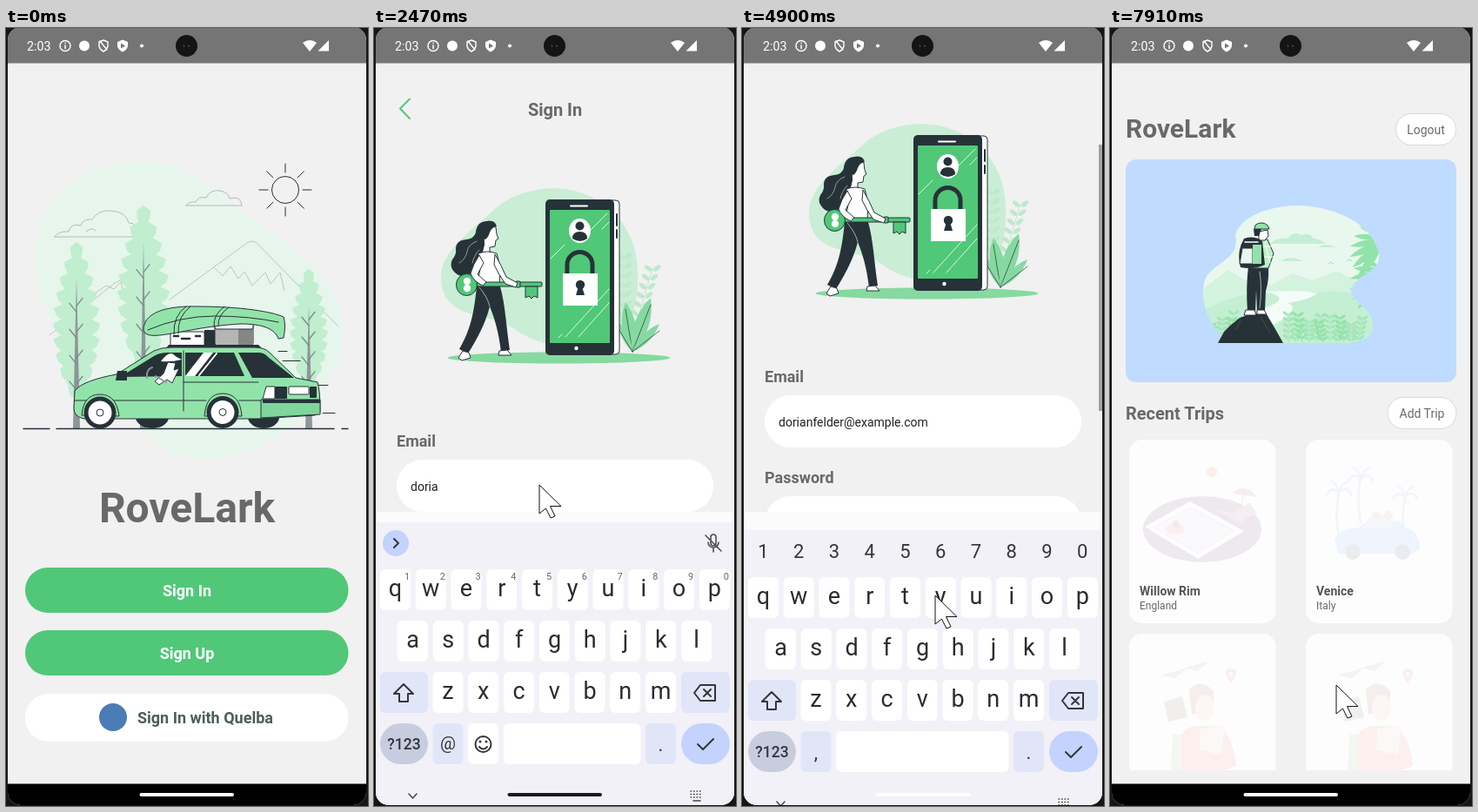
These frames come from a looping animation (416x894 px, 8000 ms). An HTML page:

```html
<!DOCTYPE html>
<html lang="en">
<head>
<meta charset="utf-8">
<title>Trip planner sign-in</title>
<style>
html, body { margin: 0; width: 100%; height: 100%; overflow: hidden; background: #161616; }
svg { display: block; width: 100vw; height: 100vh; font-family: Roboto, sans-serif; }
.b { font-weight: 700; }
.h { font-weight: 500; }
.m { text-anchor: middle; }
.e { text-anchor: end; }
</style>
</head>
<body>
<svg id="stage" viewBox="0 0 416 894"></svg>
<script>
const GREEN = '#50c878', MINT = '#92e3a9', LEAF = '#86d9a0', DARK = '#263238', GRAY = '#696969', KEYS = '#f2f1f8', INK = '#35363c';
const EMAIL = 'dorianfelder@example.com';

const text = (x, y, size, fill, str, cls = '') =>
  `<text x="${x}" y="${y}" font-size="${size}" fill="${fill}" class="${cls}">${str}</text>`;
const box = (x, y, w, h, r, fill, extra = '') =>
  `<rect x="${x}" y="${y}" width="${w}" height="${h}" rx="${r}" fill="${fill}" ${extra}/>`;
const dot = (x, y, r, fill, extra = '') => `<circle cx="${x}" cy="${y}" r="${r}" fill="${fill}" ${extra}/>`;
const oval = (x, y, rx, ry, fill, extra = '') =>
  `<ellipse cx="${x}" cy="${y}" rx="${rx}" ry="${ry}" fill="${fill}" ${extra}/>`;
const path = (d, fill, extra = '') => `<path d="${d}" fill="${fill}" ${extra}/>`;
const line = (d, color = DARK, w = 1, extra = '') =>
  `<path d="${d}" fill="none" stroke="${color}" stroke-width="${w}" stroke-linecap="round" stroke-linejoin="round" ${extra}/>`;
const outlined = `stroke="${DARK}" stroke-width="1" stroke-linejoin="round"`;
const range = n => [...Array(n).keys()];
const button = (id, x, y, w, label) =>
  `<g id="${id}">${box(x, y, w, 52, 26, GREEN)}${text(208, y + 33, 18, '#fff', label, 'b m')}</g>`;

// Jagged poplar with a tapered trunk
function tree(x, top, len, w) {
  const n = 10, s = len / n, right = [], left = [];
  range(n).forEach(i => {
    const u = (i + .6) / n, h = w * Math.sin(Math.PI * u ** 1.25) ** .6, y = top + s * (i + 1);
    right.push(`${x + h} ${y - s * .7} ${x + h * .9} ${y - s * .3} ${x + h * .62} ${y}`);
    left.unshift(`${x - h * .62} ${y} ${x - h * .9} ${y - s * .3} ${x - h} ${y - s * .7}`);
  });
  const twigs = range(4).map(i => {
    const y = top + len * (.36 + i * .17);
    return `M${x} ${y + 9}l7 -9M${x} ${y + 16}l-8 -10`;
  }).join('');
  return path(`M${x} ${top}L${right.join(' ')} ${left.join(' ')}Z`, '#c0eecf',
      'stroke="#c0eecf" stroke-width="2" stroke-linejoin="round"') +
    path(`M${x} ${top + 40}L${x + 4} 460H${x - 4}Z`, '#8e9698') + line(twigs, '#7d888b', 1.3);
}

// Pointed leaf from base to tip; bulge is relative to its length
function leaf(bx, by, x, y, bulge, color) {
  const mx = (bx + x) / 2, my = (by + y) / 2, px = (by - y) * bulge, py = (x - bx) * bulge;
  return path(`M${bx} ${by}Q${mx - px} ${my - py} ${x} ${y}Q${mx + px} ${my + py} ${bx} ${by}Z`, color);
}

// Stem with pairs of small leaves
function sprig(x, y, h, r, color, k = 5, lean = 0) {
  const leaves = range(k).map(i => {
    const yy = y - h * (i + 1) / k, xx = x + lean * (i + 1) / k;
    return [-1, 1].map(d => oval(xx + d * r, yy, r, r * .5, color, `transform="rotate(${d * -38} ${xx + d * r} ${yy})"`)).join('');
  }).join('');
  return line(`M${x} ${y}L${x + lean} ${y - h}`, color) + leaves;
}

const wheel = (x, y) => dot(x, y, 18.5, DARK) + dot(x, y, 13.5, '#fff') + dot(x, y, 4, '#fff', outlined);

function carArt() {
  const rays = range(8).map(i => {
    const a = i * Math.PI / 4, c = Math.cos(a), s = Math.sin(a);
    return `M${321 + 20 * c} ${186 + 20 * s}L${321 + 30 * c} ${186 + 30 * s}`;
  }).join('');
  return path('M152 153C92 153 34 195 34 265C34 330 70 360 110 400C150 450 170 496 235 495C310 494 388 420 387 340C386 280 300 235 250 195C215 165 190 153 152 153Z', '#e6f6ec') +
    line('M56 240H156M56 240Q60 233 72 234Q74 224 86 227Q88 219 99 220Q106 209 120 210Q138 211 141 224Q152 223 150 240M92 234Q99 228 103 233M207 204H271M207 204Q210 199 218 200Q221 193 230 195Q235 185 246 187Q256 189 257 196Q270 192 271 204', '#b0b4b4', .9) +
    line('M50 353L125 293L137 287L150 300M188 312L277 247Q282 243 288 247L382 343M102 305L115 296L124 300L132 292L135 304M240 276L249 285L258 274L267 288L274 280L283 296L298 281L304 294L315 281L320 302', '#b9bdbd', .9) +
    dot(321, 186, 15.5, 'none', outlined) + line(rays) +
    tree(81, 247, 176, 26) + tree(158, 205, 185, 29) + tree(348, 278, 134, 21) +
    line('M20 460.5H50M58 460.5H377M386 460.5H393', DARK, 1.4) +
    line('M313 371.5H323M318 382.5H338M358 410.5H370M364 442.5H378') +
    oval(168, 447, 19, 13, DARK) + oval(296, 447, 18, 13, DARK) +
    box(189, 349, 39, 16, 1, '#fff', outlined) + box(228, 347, 12, 18, 0, DARK) +
    box(240, 338, 44, 27, 3, '#b5b5b5', outlined) + box(267, 346, 17, 19, 0, '#868686') + box(240, 338, 44, 8, 2, '#f2f2f2', outlined) +
    line('M193 354H198M218 354H223M202 357H211', DARK, 2.5) +
    path('M158 347C158 327 184 319 220 320C270 320 306 326 319 332Q322 342 319 356L313 357C309 346 296 340 270 340C230 342 202 350 177 353Q159 355 158 347Z', MINT, outlined) +
    line('M163 347Q200 331 240 331T313 338M193 352Q192 330 207 320M198 351Q197 331 212 320M239 343Q238 329 251 320M244 342Q243 330 256 321') +
    path('M184 368L187 364H290L294 368Z', DARK) +
    path('M79 417Q88 405 127 398L170 371Q178 367 190 367H286Q297 367 303 373L333 402L358 407Q361 416 361 441L355 445L290 449H90Q78 447 78 437Z', MINT, outlined) +
    path('M131 401L170 377Q176 373 186 373H202V400Z', DARK) + path('M206 373H262L274 400H206Z', DARK) +
    path('M267 373H290Q297 373 301 378L331 402H283Z', DARK) +
    path('M206 400L227 373H238L217 400Z', '#fff') + line('M222 399L242 374', '#fff', 2) +
    line('M204 371V440M79 428H230M268 428H360M204 407H290') +
    path('M128 394H139V405H126Z', DARK) +
    path('M178 383Q185 373 191 374Q196 379 202 381Q190 384 178 383Z', '#fff') +
    path('M186 384L195 385L193 393L199 391L191 408L185 404L176 410L171 406L181 397Z', '#fff', outlined) +
    line('M162 402Q161 392 168 390M172 400L184 407', '#8e9698', 2) +
    path('M295 426L299 412H309V426Z', '#fff', outlined) + box(309, 412, 14, 14, 1, DARK) + box(325, 412, 23, 9, 1, '#fff', outlined) + box(349, 412, 8, 13, 1, DARK) +
    path('M293 427H361V444L293 448Z', '#7fd69a', outlined) + line('M296 428H360V430H296Z', DARK, 2) +
    path('M87 445Q89 421 108 421Q127 421 130 446Z', MINT, outlined) + path('M228 446Q230 420 249 420Q269 420 271 446Z', MINT, outlined) +
    wheel(108, 442) + wheel(249, 441.5);
}

function lockArt() {
  const plant = (x, y, bulge) => leaf(297, 379, x, y, bulge, LEAF) + line(`M297 379L${x} ${y + 8}`, DARK, .7);
  return path('M77 292C78 262 112 240 140 214C160 196 195 187 225 193C268 201 301 235 303 285C305 330 292 372 250 374C215 376 185 370 160 352C135 333 76 345 77 292Z', '#c9eed5') +
    oval(212.5, 386, 128, 6.5, LEAF) +
    sprig(287, 345, 76, 5, '#bfe9cb', 7) + sprig(302, 345, 62, 5, '#bfe9cb', 6, 18) +
    plant(289, 322, .28) + plant(318, 317, .25) + plant(328, 347, .22) + plant(281, 345, .2) +
    box(268, 205, 14, 177, 4, '#fff', outlined) + line('M279 221V234M279 239V248', DARK, 2) +
    box(197, 204, 79, 179, 5, DARK) + box(202, 216, 69, 153, 1, GREEN) +
    line('M226 211.5H245', '#fff', 2) + dot(232.5, 375, 2.2, '#fff') +
    line('M203 272L219 256M240 248L268 220M262 238L270 230M220 362L270 307M235 362L270 323M212 363L216 359', '#d9f6e3', 1) +
    oval(236.5, 240, 12.5, 14, '#fff') + dot(236.5, 234.5, 5, DARK) + path('M228 249Q228 241 236.5 241Q245 241 245 249Q237 255 228 249Z', DARK) +
    line('M222 290V279A14.5 14.5 0 0 1 251 279V290', DARK, 5) + box(217, 289, 40, 37, 0, '#fff') +
    dot(237, 302, 5.2, DARK) + path('M235 304H239L242 314H232Z', DARK) +
    path('M127 232Q118 233 117 242Q115 249 106 250Q94 251 94 261Q95 267 90 273Q86 281 93 288Q99 294 107 291Q118 288 121 275Q129 263 130 247Z', DARK) +
    line('M118 252Q108 256 107 264Q105 273 98 277M121 262Q115 268 113 277', '#fff', .5) +
    path('M128 240Q134 233 140 236L141 244L143 249L140 251L139 258L133 259V265L124 266Q128 256 126 246Z', '#fff', outlined) +
    path('M117 244Q117 230 129 229Q139 227 141 235Q135 236 133 242Q131 248 128 250Z', DARK) +
    path('M120 266Q130 262 141 266L145 281L144 304H118L122 284Z', '#fff', outlined) +
    path('M118 304H145C151 325 152 352 156 377L146 379C143 355 139 342 133 327C128 347 118 365 108 381L98 376C111 354 115 334 118 304Z', DARK) +
    line('M121 305Q131 317 133 327', '#fff', .6) +
    path('M102 378L109 380L111 386L101 389L97 386Z', '#fff', outlined) + path('M144 378L153 377L158 383H143Z', '#fff', outlined) +
    box(116, 299, 77, 5, 1, GREEN, outlined) + box(163, 298, 5, 7, 1, GREEN, outlined) + path('M174 304H188V317L184 315L181 318L178 315L174 317Z', GREEN, outlined) +
    oval(106.5, 302, 12, 12.5, GREEN, outlined) + dot(107, 298, 4.2, '#fff') + dot(107, 306, 4.2, '#fff') +
    path('M121 268Q114 278 111 289Q114 298 125 303L129 299L119 290L126 277Z', '#fff', outlined) +
    path('M139 267Q147 281 152 293L165 300L163 305L151 301Q143 290 138 279Z', '#fff', outlined);
}

function hikerArt() {
  const bush = range(15).map(i =>
    sprig(i < 4 ? 121 + i * 8 : 173 + i * 8, 361, 20 + (i * 7) % 15, 3.4, i % 3 ? '#a5e5b9' : MINT, 5, (i % 3 - 1) * 5)).join('');
  const frond = [[311, 238], [311, 275]].map(([x, y]) => range(6).map(i => {
    const a = 2.3 + i * .32;
    return leaf(x, y + i * 3, x + 36 * Math.cos(a), y + i * 4 - 26 * Math.sin(a) + 10, .2, MINT);
  }).join('')).join('');
  return `<clipPath id="view">${path('M144 238C151 214 188 204 216 204C264 205 304 229 309 259C312 281 282 284 277 299C274 314 302 322 302 341C302 357 287 362 262 362H140C112 342 105 318 108 293C113 270 151 268 144 238Z', '#fff')}</clipPath>
    <g clip-path="url(#view)">${box(100, 200, 215, 170, 0, '#e9f8ee')}` +
    path('M183 248Q193 240 204 242Q212 232 220 238Q229 234 234 242Q242 242 248 248Z', '#c4efd2') +
    path('M196 268Q207 260 222 268ZM239 252Q247 246 260 252Z', '#c4efd2') + line('M251 271l3 -2l3 2M272 268l3 -2l3 2', MINT) +
    path('M100 305L136 278L174 301L210 282L232 290L260 279L315 306V370H100Z', '#d4f3de') +
    path('M100 330Q150 295 212 309Q270 292 315 319V370H100Z', '#c4efd2') +
    path('M180 303Q219 300 238 305Q231 312 204 316Q221 322 190 340L176 345V322Q211 311 180 303Z', '#f5fcf7') + frond + bush + '</g>' +
    path('M124 362L131 349L138 342L149 333L163 328L180 329L190 346L199 362Z', DARK) + line('M150 336L145 346M173 332L184 350', '#566369', .6) +
    path('M159 274H182Q183 290 179 302L178 325H169L168 301L167 326H158Q156 298 159 274Z', DARK) + line('M172 280Q175 300 172 322', '#fff', .6) +
    path('M156 324H166L168 330H154ZM169 324H177L180 329H169Z', '#fff', outlined) +
    path('M163 243H181L188 259L185 268L182 276H162Z', '#bdeecb', outlined) + line('M178 246L184 270M173 251H185M175 263H187', '#fff') +
    path('M171 234L181 232L182 239L178 244H171Z', '#fff', outlined) + path('M166 231Q166 224 174 224Q181 224 183 231Z', MINT, outlined) + path('M165 231H174L171 239H166Z', DARK) +
    path('M154 242Q166 238 175 245L178 272Q166 278 150 275Q145 257 154 242Z', DARK) + path('M152 253H164V271H149Z', '#e9f8ee', outlined) + path('M164 249H174V271H164Z', MINT) + line('M155 246H170', '#fff', 1.5);
}

const traveller = x => `<g transform="translate(${x})" opacity=".75">` +
  path('M72 853Q74 807 96 802H123Q141 810 145 848L132 853Z', '#e8604f') + path('M91 760Q105 746 119 762V788H94Z', '#9c4840') +
  oval(109, 781, 11, 15, '#f3b49a') + path('M62 774L83 768L89 792L67 797Z', '#714a4a') + path('M104 805L132 801L128 835L103 830Z', '#f7c0b0') +
  path('M58 744L89 735L75 747ZM86 735L113 728L101 739Z', '#7e8796') + path('M139 753Q127 737 139 736Q151 737 139 753Z', '#e8604f') + dot(139, 742, 2, '#fff') +
  path('M72 812H82V853H70Z', '#7fb58f') + '</g>';

function cardArt() {
  const palm = (x, y) => line(`M${x} ${y}Q${x - 5} ${y + 25} ${x} ${y + 50}M${x} ${y}q-8 -8 -14 2M${x} ${y}q8 -9 14 2M${x} ${y}q-3 -12 -9 -13M${x} ${y}q4 -12 10 -12`, '#8fb2ea', 2.5);
  return dot(117, 510, 6, '#f0755a') + oval(106, 576, 68, 38, '#6c4778') +
    path('M40 573L92 544L154 578L101 610Z', '#fff') + path('M50 574L92 551L143 578L101 603Z', '#e3dcec', 'stroke="#a990b4"') +
    oval(75, 576, 11, 6, '#ee8d80') + dot(76, 570, 4, '#9b5a4d') + path('M140 535Q155 520 169 539ZM122 553L142 558L160 545L168 557L148 569Z', '#b38398') + line('M154 531L150 556', '#806080') +
    palm(263, 534) + palm(288, 518) + palm(339, 539) +
    path('M258 588Q262 575 285 575L297 566H333L338 574Q357 578 356 599L347 604H262Z', '#7da8f8') + dot(279, 602, 9, '#58678c') + dot(336, 602, 9, '#58678c') +
    path('M289 574L303 558H320L326 574Z', '#b9c7e8') + dot(306, 560, 5, '#d39a86') + dot(320, 560, 5, '#d39a86') +
    traveller(0) + traveller(203);
}

function homePage() {
  const pill = (x, y, w, label) => box(x, y, w, 36, 18, '#fff', 'stroke="#d9d9d9"') + text(x + w / 2, y + 23, 14, GRAY, label, 'm');
  const cards = [[22, 473], [225, 473], [22, 696], [225, 696]].map(([x, y]) => box(x, y, 168.5, 211, 15, '#fdfdfd')).join('');
  return text(18, 126, 30, GRAY, 'RoveLark', 'b') + pill(328.5, 98.5, 69, 'Logout') +
    box(18, 151, 380, 256, 12, '#bfdbff') + hikerArt() +
    text(18, 450, 20, GRAY, 'Recent Trips', 'b') + pill(319, 424.5, 79, 'Add Trip') +
    `<g clip-path="url(#list)">${cards}<g id="art">${cardArt()}</g></g>` +
    text(34, 652, 14, '#555', 'Willow Rim', 'b') + text(34, 668, 12, GRAY, 'England') +
    text(237, 652, 14, '#555', 'Venice', 'b') + text(237, 668, 12, GRAY, 'Italy');
}

function keyboard() {
  const key = (x, y, w, fill = '#fff', r = 6) => box(x, y, w, 47, r, fill);
  const letters = [['qwertyuiop', 7, 625], ['asdfghjkl', 27, 684], ['zxcvbnm', 67.5, 743]].map(([row, x0, y]) =>
    [...row].map((c, i) => {
      const x = x0 + i * 40.75;
      return key(x, y, 35) + text(x + 17.5, y + 31, 27, '#2b2c31', c, 'm');
    }).join('')).join('');
  const digits = (y, size, dx, fill) => [...'1234567890'].map((c, i) => text(24.5 + i * 40.75 + dx, y, size, fill, c, 'm')).join('');
  return box(0, 571, 416, 330, 0, KEYS) + letters +
    key(7, 743, 55, '#e1e5f8') + key(353, 743, 56, '#e1e5f8') +
    line('M34 757L23 768H29V777H39V768H45Z', INK, 2) +
    line('M368 767L375 758H392V776H375ZM379 763L387 771M387 763L379 771', INK, 2) +
    key(7, 802, 55, '#c7cddf', 23.5) + text(34.5, 832, 17.5, INK, '?123', 'h m') +
    key(67.5, 802, 35, '#e1e5f8') + key(312, 802, 35, '#e1e5f8') + text(329.5, 834, 22, INK, '.', 'm') +
    key(353, 802, 56, '#c3d3fd', 23.5) + line('M372 826L378 832L390 820', INK, 2) +
    '<g id="mailKeys">' + digits(637, 11, 13.5, '#666') + dot(25, 595, 15, '#c3d3fd') + line('M23 590L28 595L23 600', INK, 2) +
    line('M387 595V588A3 3 0 0 1 393 588V595A3 3 0 0 1 387 595M384 594A6 6 0 0 0 396 594M390 601V605M381 586L399 604', '#4b4c52', 1.6) +
    text(85, 832, 20, INK, '@', 'm') + key(108, 802, 35) + key(149, 802, 157.5) +
    dot(125.5, 826, 9, 'none', `stroke="${INK}" stroke-width="2"`) + dot(122, 823, 1.5, INK) + dot(129, 823, 1.5, INK) + line('M121 829Q125.5 834 130 829', INK, 2) + '</g>' +
    `<g id="passKeys"><g id="digits">${digits(603, 22, 0, INK)}</g>` + text(85, 834, 22, INK, ',', 'm') + key(108, 802, 198.5) + '</g>';
}

const navIcons = line('M40 883L44.5 888L49 883', '#44454a', 1.5) + line('M367 891H375', '#44454a', 1.6) +
  range(3).map(r => line(`M364 ${880 + r * 3.5}H378`, '#44454a', 1.6, 'stroke-dasharray="0.5 3"')).join('');

const statusBar = box(0, 0, 416, 40.5, 0, '#757575') + text(24, 25.5, 14.3, '#fff', '2:03') +
  dot(68, 20.5, 6, 'none', 'stroke="#fff" stroke-width="1.4"') + line('M68 20V23.5M68 17.3V17.5', '#fff', 1.5) + dot(90, 20.5, 6, '#fff') +
  line('M112 14L117 16V21Q116 25 112 27Q108 25 107 21V16ZM108 15L116 25', '#fff', 1.4) +
  path('M134 13.5L140 16V21Q139 25 134 27.5Q129 25 128 21V16Z', '#fff') + path('M132 17.5L137 20.5L132 23.5Z', '#757575') + dot(156, 20.5, 2, '#fff') +
  dot(207.5, 20.5, 12.5, '#141414') + dot(204.5, 20.5, 1, '#555') + dot(210, 20.5, 1, '#555') +
  path('M341 17Q349 11 357 17L349 27Z', '#fff') + path('M358.5 26.5H371V14Z', '#fff');

document.getElementById('stage').innerHTML = `
<defs>
  <clipPath id="screen"><rect x="2" y="-1" width="412" height="894" rx="15"/></clipPath>
  <clipPath id="list"><rect y="460" width="416" height="393"/></clipPath>
  <clipPath id="pane"><rect id="paneBox" y="40" width="416" height="829"/></clipPath>
</defs>
<g clip-path="url(#screen)">
  ${box(0, 0, 416, 894, 0, '#f1f1f1')}
  <g id="welcome">${carArt()}
    ${text(208, 568, 48, GRAY, 'RoveLark', 'b m')}
    ${button('enter', 22, 620, 371.5, 'Sign In')}${button('join', 22, 692, 371.5, 'Sign Up')}
    ${box(22, 765, 371.5, 55, 27.5, '#fff')}${dot(123, 792, 16, '#4a7cb5')}${text(151, 799, 18, '#4d5c5c', 'Sign In with Quelba', 'b')}
  </g>
  <g id="login" clip-path="url(#pane)">${box(0, 40, 416, 829, 0, '#f1f1f1')}
    <g id="form">${line('M41 88.5L30 99.5L41 111', GREEN, 2)}${text(208, 108, 20, GRAY, 'Sign In', 'b m')}${lockArt()}
      ${text(26, 488, 18, GRAY, 'Email', 'b')}${box(26, 503, 364, 60, 30, '#fff')}${text(42, 538.5, 14, '#222', '<tspan id="mail"></tspan>')}
      ${text(26, 604, 18, GRAY, 'Password', 'b')}${box(26, 619, 364, 60, 30, '#fff')}<g id="dots">${range(9).map(i => dot(43.5 + i * 5, 649, 1.5, '#222')).join('')}</g>
      ${text(389, 714, 14, '#737373', 'Forget Password', 'e')}${button('submit', 18, 793, 380, 'Sign In')}
    </g>
  </g>
  <rect id="strip" y="556" width="416" height="313" fill="#fbfbfb"/>
  <rect id="bar" x="410" y="134" width="4" height="306" fill="#a0a0a0"/>
  <g id="home">${box(0, 40, 416, 829, 0, '#f1f1f1')}${homePage()}</g>
  <g id="board">${keyboard()}</g>
  <rect id="nav" y="868.5" width="416" height="26"/>
  <g id="navIcons">${navIcons}</g>
  <rect id="pill" x="153.5" y="879" width="108.5" height="4" rx="2"/>
  ${statusBar}
</g>
<path id="cursor" d="M0 0V33L7.5 27L13 38L18 36L12.5 24.5H25Z" fill="#fff" stroke="#111"/>`;

const LOOP = 8000, FIRST = 440, STEP = 173.7, PHASE = 370;
// Each row: step, then values; linear between rows
const POINTER = [[0, 140, 560], [2, 177, 632], [6, 177, 632], [8, 190, 525], [14, 190, 525], [17, 297, 685], [18, 297, 685],
  [22, 222, 652], [27, 222, 652], [29, 380, 822], [30, 395, 803], [31, 395, 803], [35, 238, 797], [38, 238, 797], [41, 260, 755]];
// opacity, drop, scroll, nav lightness
const BOARD = [[9, 0, 30, 0, 0], [10, .4, 16, 0, .4], [11, 1, -3, -7, 1], [16, 1, -3, -7, 1], [17, 1, 0, -7, .7], [18, .35, 20, 0, .4], [19, 0, 30, 0, 0],
  [25, 0, 30, 0, 0], [26, 1, 6, -81, 1], [27, 1, -3, -123, 1], [29, 1, -3, -123, 1], [30, .65, 16, 0, .66], [31, .1, 24, 0, .3], [32, 0, 30, 0, 0]];
const ENTER = [[1, 1], [2, .2]], LOGIN = [[3, 0], [5, 1]], MAIL = [[11, 0], [16, EMAIL.length]], DOTS = [[26, 0], [29, 9]];
const SUBMIT = [[34, 1], [36, .2]], HOME = [[37, 0], [39, 1]], ART = [[39, 0], [43, .11]];
const SECOND_FIELD = 24;

function at(table, n) {
  const j = table.findIndex(row => row[0] >= n);
  if (j < 0) return table[table.length - 1].slice(1);
  if (j === 0) return table[0].slice(1);
  const a = table[j - 1], b = table[j], u = (n - a[0]) / (b[0] - a[0]);
  return a.slice(1).map((v, i) => v + (b[i + 1] - v) * u);
}

const el = {};
document.querySelectorAll('#stage [id]').forEach(e => el[e.id] = e);
const show = (e, v) => { e.style.display = v > 0 ? '' : 'none'; e.setAttribute('opacity', Number(v)); };

function draw(t) {
  const n = t < FIRST ? -1 : Math.floor((t - PHASE) / STEP);
  const [x, y] = at(POINTER, n);
  const [alpha, drop, scroll, light] = at(BOARD, n);
  const [login] = at(LOGIN, n), solid = alpha === 1, second = n >= SECOND_FIELD;
  const settling = second && solid && drop > 0;

  show(el.cursor, n >= 0);
  el.cursor.setAttribute('transform', `translate(${x} ${y})`);

  show(el.enter, at(ENTER, n)[0]);
  show(el.welcome, login < 1);
  show(el.login, login);
  show(el.home, at(HOME, n)[0]);
  show(el.art, at(ART, n)[0]);
  show(el.submit, at(SUBMIT, n)[0]);

  el.form.setAttribute('transform', `translate(0 ${scroll})`);
  el.paneBox.setAttribute('height', scroll ? 516 : 829);
  show(el.strip, scroll < 0);
  show(el.bar, scroll < -80);
  el.mail.textContent = EMAIL.slice(0, Math.round(at(MAIL, n)[0]));
  const typed = Math.round(at(DOTS, n)[0]);
  [...el.dots.children].forEach((d, i) => show(d, i < typed));

  show(el.board, alpha);
  show(el.navIcons, solid);
  el.board.setAttribute('transform', `translate(0 ${drop})`);
  el.navIcons.setAttribute('transform', `translate(0 ${drop})`);
  show(el.mailKeys, !second);
  show(el.passKeys, second);
  show(el.digits, solid);
  el.nav.setAttribute('fill', `rgb(${[242, 241, 248].map(v => Math.round(v * light))})`);
  el.pill.setAttribute('fill', light > .35 && !settling ? '#1c1c1e' : '#fff');
}

const start = performance.now();
function tick() {
  draw((performance.now() - start) % LOOP);
  requestAnimationFrame(tick);
}
tick();
</script>
</body>
</html>
```
